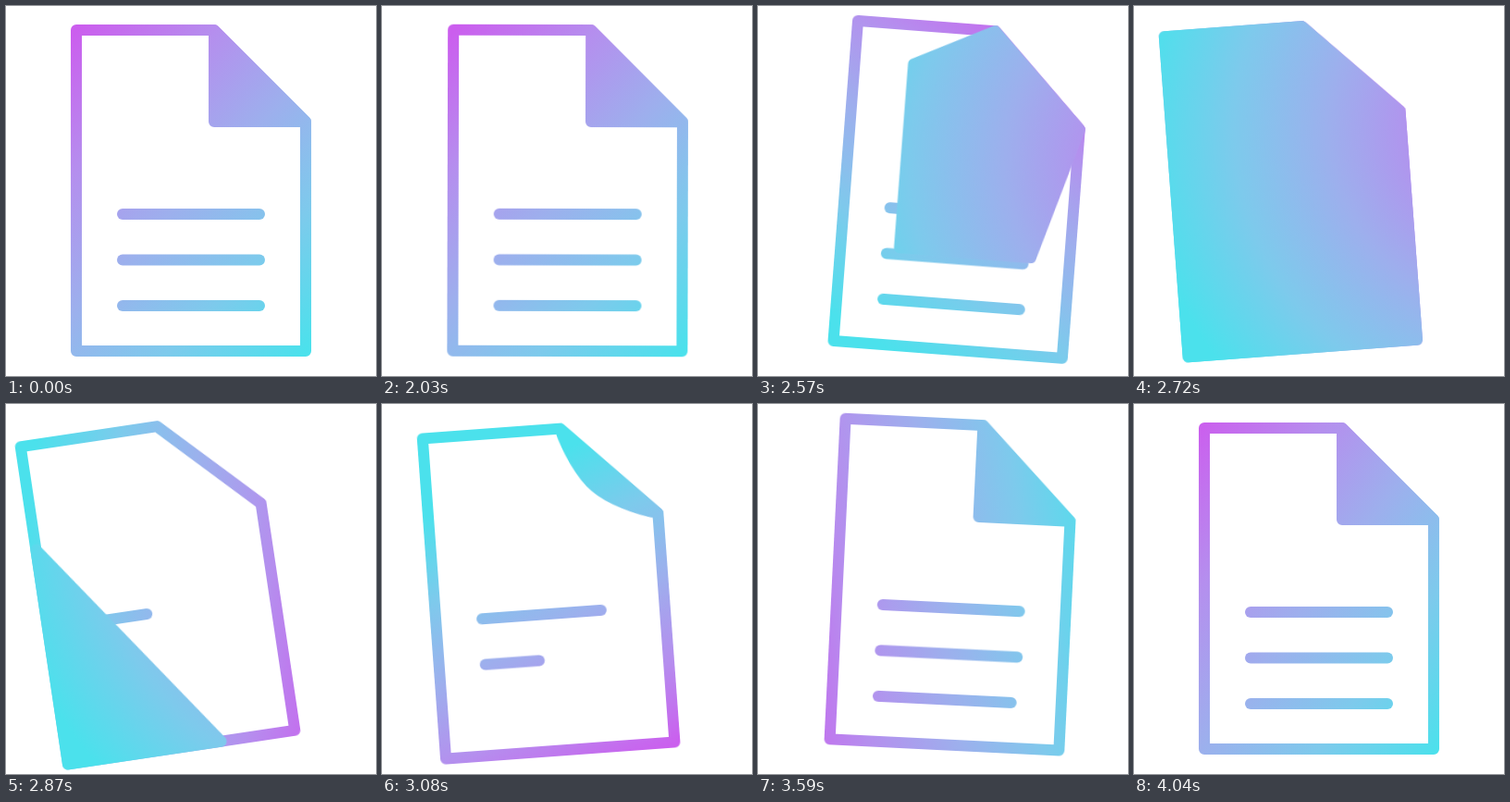
An HTML page without scripts for the animation above (4430 ms loop, 400 by 400 pixels).

```html
<!DOCTYPE html>
<html lang="en">
<head>
<meta charset="utf-8">
<title>Page turn</title>
<style>
html, body { margin: 0; width: 100%; height: 100%; overflow: hidden; background: #fff; }
svg { display: block; width: 100vw; height: 100vh; }
.page, .page * {
  animation-duration: 4430ms;
  animation-iteration-count: infinite;
  animation-timing-function: linear;
}
.page {
  fill: none; stroke: url(#ink); stroke-width: 12;
  stroke-linecap: round; stroke-linejoin: round;
  transform-origin: 200px 199.5px;
  animation-name: sway;
}
.fold { fill: url(#ink); animation-name: fold; }
.cover { fill: url(#back); stroke: url(#back); opacity: 0; animation-name: cover; }
.line { stroke-dasharray: 148 400; }
.l1 { animation-name: line1; }
.l2 { animation-name: line2; }
.l3 { animation-name: line3; }

@keyframes sway {
  0%, 45.15% { transform: none; animation-timing-function: ease-in-out; }
  53.27% { transform: translate(54.5px, -1px) rotate(8.9deg); animation-timing-function: cubic-bezier(.45, 0, .8, .65); }
  57.79% { transform: translate(22px, -1px) rotate(5deg); }
  61.4% { transform: translate(-30.5px, -2.5px) rotate(-4.2deg); animation-timing-function: cubic-bezier(.2, .5, .55, 1); }
  65.01% { transform: translate(-36px, 0) rotate(-8.5deg); animation-timing-function: cubic-bezier(.45, 0, .8, .65); }
  69.53% { transform: translate(-20px, 2px) rotate(-4.2deg); animation-timing-function: cubic-bezier(.3, .3, .65, .8); }
  74.94% { transform: translate(13.5px, -6px) rotate(4deg); animation-timing-function: ease-out; }
  76.52% { transform: translate(16px, -7px) rotate(4.5deg); animation-timing-function: ease-in-out; }
  87.13%, 100% { transform: none; }
}

/* the corner lies flat on the new page, then curls into a triangle */
@keyframes fold {
  0%, 60.8% { d: path("M225 26C225 60 225 125 225 125C225 125 290 125 324 125Z"); }
  60.81%, 65.46% { d: path("M225 26C241 42 258 59 274.5 75.5C291 92 308 109 324 125Z"); }
  69.53% { d: path("M225 26C231 49 244 77 258.5 91.5C273 106 301 119 324 125Z"); }
  74.94% { d: path("M225 26C224 66 227 107 235 115C243 123 284 126 324 125Z"); animation-timing-function: ease-out; }
  80.36%, 100% { d: path("M225 26C225 60 225 125 225 125C225 125 290 125 324 125Z"); }
}

/* the flap spreads over the sheet, then leaves by the lower left */
@keyframes cover {
  0%, 54.84% { opacity: 0; d: path("M225 26L225 125L225 125L225 125L324 125Z"); }
  54.85% { opacity: 1; d: path("M225 26L225 125L225 125L225 125L324 125Z"); animation-timing-function: ease-in-out; }
  60.72%, 61.85% { opacity: 1; d: path("M225 26L76 26L76 373L324 373L324 125Z"); animation-timing-function: ease-in; }
  64.33% { opacity: 1; d: path("M76 26L76 26L76 373L324 373L324 373Z"); animation-timing-function: ease-out; }
  66.59% { opacity: 1; d: path("M76 373L76 373L76 373L76 373L76 373Z"); }
  66.6%, 100% { opacity: 0; d: path("M76 373L76 373L76 373L76 373L76 373Z"); }
}

@keyframes line1 {
  0%, 60.8% { stroke-dashoffset: 0; }
  60.81%, 62.3% { stroke-dashoffset: 170; }
  62.31% { stroke-dashoffset: 148; animation-timing-function: cubic-bezier(.333, .667, .667, 1); }
  73.59%, 100% { stroke-dashoffset: 0; }
}
@keyframes line2 {
  0%, 60.8% { stroke-dashoffset: 0; }
  60.81%, 67.04% { stroke-dashoffset: 170; }
  67.05% { stroke-dashoffset: 148; animation-timing-function: cubic-bezier(.333, .667, .667, 1); }
  78.33%, 100% { stroke-dashoffset: 0; }
}
@keyframes line3 {
  0%, 60.8% { stroke-dashoffset: 0; }
  60.81%, 71.67% { stroke-dashoffset: 170; }
  71.68% { stroke-dashoffset: 148; animation-timing-function: cubic-bezier(.333, .667, .667, 1); }
  82.96%, 100% { stroke-dashoffset: 0; }
}
</style>
</head>
<body>
<svg viewBox="0 0 400 400">
  <defs>
    <linearGradient id="ink" gradientUnits="userSpaceOnUse" x1="-10" y1="200" x2="410" y2="200" gradientTransform="rotate(45 200 200)">
      <stop offset="0" stop-color="#cb5eee"/>
      <stop offset=".25" stop-color="#b58eee"/>
      <stop offset=".5" stop-color="#9dafed"/>
      <stop offset=".75" stop-color="#7dcaec"/>
      <stop offset="1" stop-color="#4be1ec"/>
      <animateTransform attributeName="gradientTransform" type="rotate" dur="4430ms" repeatCount="indefinite"
        keyTimes="0;.4515;.4966;.5327;.614;.6953;.7494;.8713;.912;1"
        values="45 200 200;45 200 200;50 200 200;59 200 200;160 200 200;248 200 200;307 200 200;392 200 200;397 200 200;397 200 200"/>
      <animate attributeName="x2" dur="4430ms" repeatCount="indefinite"
        keyTimes="0;.5327;.6953;.7494;.8713;1" values="410;410;330;346;410;410"/>
    </linearGradient>
    <radialGradient id="back" href="#ink" gradientUnits="userSpaceOnUse" cx="454" cy="151" r="415" gradientTransform="rotate(0)"/>
  </defs>
  <g class="page">
    <path d="M76 26H225L324 125V373H76Z"/>
    <path class="line l1" d="M126 225h148"/>
    <path class="line l2" d="M126 274.5h148"/>
    <path class="line l3" d="M126 324h148"/>
    <path class="fold" d="M225 26C225 60 225 125 225 125C225 125 290 125 324 125Z"/>
    <path class="cover" d="M225 26L225 125L225 125L225 125L324 125Z"/>
  </g>
</svg>
</body>
</html>
```
